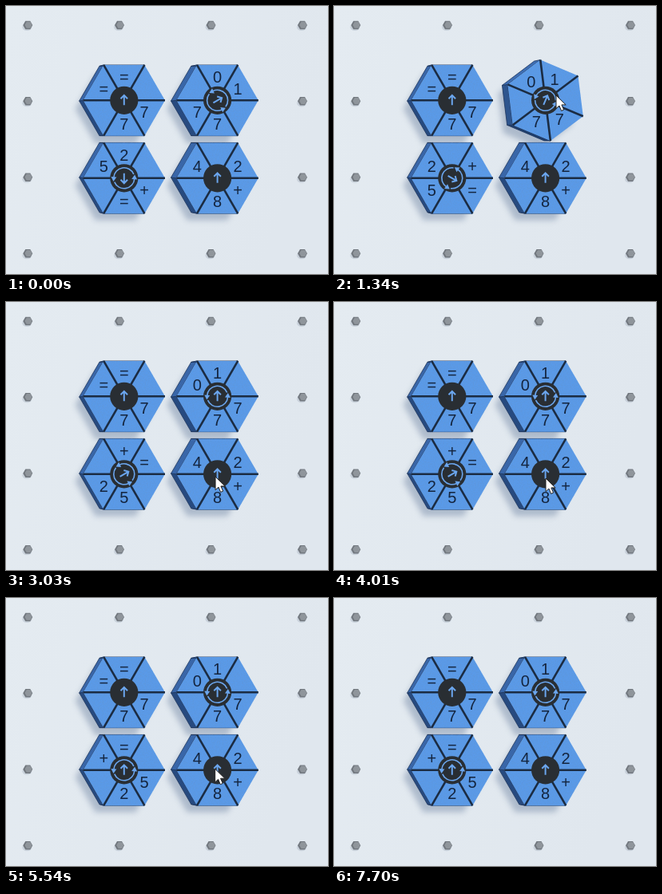
An HTML page that plays this animation: 403 by 336 pixels, repeating every 7770 ms.

```html
<!DOCTYPE html>
<html lang="en">
<head>
<meta charset="utf-8">
<title>Hex tiles</title>
<style>
  html, body { margin: 0; width: 100%; height: 100%; overflow: hidden; background: #e1e8ef; }
  svg { display: block; width: 100vw; height: 100vh; }
  text { font: 20px "Liberation Sans", Arial, sans-serif; fill: #14253f; text-anchor: middle; }
</style>
</head>
<body>
<svg id="stage" viewBox="0 0 403 336">
  <defs>
    <linearGradient id="bg" x1="0" x2="1" y1="0" y2="0.3">
      <stop offset="0" stop-color="#e4ebf1"/>
      <stop offset="1" stop-color="#e0e7ee"/>
    </linearGradient>
    <filter id="blur" x="-30%" y="-30%" width="160%" height="160%">
      <feGaussianBlur stdDeviation="3.5"/>
    </filter>
    <filter id="grain" x="0" y="0" width="100%" height="100%">
      <feTurbulence type="fractalNoise" baseFrequency="0.7" numOctaves="2" seed="4"/>
      <feColorMatrix values="0 0 0 0 0.12  0 0 0 0 0.3  0 0 0 0 0.62  1.2 0 0 0 -0.48"/>
      <feComposite in2="SourceGraphic" operator="in" result="n"/>
      <feMerge><feMergeNode in="SourceGraphic"/><feMergeNode in="n"/></feMerge>
    </filter>
  </defs>
  <rect width="403" height="336" fill="url(#bg)"/>
  <g id="pegs"></g>
  <g id="shadows" filter="url(#blur)" fill="#8a9bb4" opacity="0.6"></g>
  <g id="tiles"></g>
  <circle id="press" r="12" fill="#c8142e" opacity="0.75"/>
  <path id="cursor" d="M0 0V16.6L3.9 13 6.6 19.4 9.6 18.1 6.9 11.9H12.2Z"
        fill="#fff" stroke="#222" stroke-width="1" stroke-linejoin="round"/>
</svg>
<script>
const LOOP = 7770, TURN = 450, PRESS = 150;
const FACE_R = 51.2, BASE_R = 50.3, LABEL_R = 29.3;
const $ = id => document.getElementById(id);

function add(parent, tag, attrs = {}, text) {
  const node = document.createElementNS('http://www.w3.org/2000/svg', tag);
  set(node, attrs);
  if (text) node.textContent = text;
  parent.appendChild(node);
  return node;
}
function set(node, attrs) {
  for (const key in attrs) node.setAttribute(key, attrs[key]);
}

const rad = deg => deg * Math.PI / 180;
const polar = (x, y, r, deg) => [x + r * Math.cos(rad(deg)), y + r * Math.sin(rad(deg))];
const hex = (x, y, r, turn = 0) => [0, 1, 2, 3, 4, 5].map(i => polar(x, y, r, turn + 60 * i));
const points = list => list.map(p => p.map(v => v.toFixed(2)).join()).join(' ');
const mix = (a, b, k) => `rgb(${a.map((v, i) => Math.round(v + (b[i] - v) * k))})`;

// Labels run clockwise from the top sector, as seen with the arrow pointing up.
const tiles = [
  { x: 147.8, y: 118.3, bx: 142, by: 119, labels: ['=', '', '7', '7', '', '='], start: 0, clicks: [] },
  { x: 264.6, y: 118.3, bx: 256.8, by: 119, labels: ['1', '', '7', '7', '', '0'], start: 60, clicks: [1169] },
  { x: 147.8, y: 215.8, bx: 142, by: 215, labels: ['=', '', '5', '2', '', '+'], start: 180, clicks: [530, 1812, 4932] },
  { x: 264.6, y: 215.8, bx: 256.8, by: 215, labels: ['', '2', '+', '8', '', '4'], start: 0, clicks: [] }
];
const presses = tiles.flatMap(t => t.clicks);

// Pointer stops: time, x, y
const stops = [
  [0, 168, 340], [70, 167, 302], [470, 161, 224], [570, 161, 224],
  [990, 277, 112], [1340, 278, 112], [1700, 161, 222], [2120, 161, 221],
  [2350, 161, 221], [2950, 262, 219], [4010, 265, 221], [4250, 265, 221],
  [4800, 161, 224], [5050, 161, 224], [5600, 265, 214], [6250, 255, 203],
  [6950, 252, 345], [LOOP, 252, 345]
];

function buildPegs() {
  for (const y of [24, 119.3, 214.8, 310.3])
    for (const x of [27.3, 142, 256.5, 371]) {
      add($('pegs'), 'ellipse', { cx: x - 1, cy: y + 2.5, rx: 6, ry: 4.5, fill: '#b9c3cf', opacity: 0.6 });
      add($('pegs'), 'polygon', { points: points(hex(x, y, 6)), fill: '#71777e' });
      add($('pegs'), 'polygon', { points: points(hex(x + 0.8, y - 0.3, 4.6)), fill: '#8f959b' });
    }
}

function buildTile(t) {
  t.shadow = add($('shadows'), 'polygon');
  const g = add($('tiles'), 'g');
  t.sides = hex(0, 0, 1).map(() => add(g, 'polygon', { stroke: '#1d355c', 'stroke-width': 0.8, 'stroke-linejoin': 'round' }));
  t.face = add(g, 'polygon', { fill: '#5a9ae8', filter: 'url(#grain)' });
  t.lines = add(g, 'path', { stroke: '#1b2c43', 'stroke-width': 2.6 });
  t.texts = t.labels.map(s => add(g, 'text', {}, s));
  add(g, 'circle', { cx: t.x, cy: t.y, r: 17.6, fill: '#292e33' });
  t.icon = add(g, 'g', { fill: 'none', stroke: '#6ba6ee', 'stroke-width': 2 });
  add(t.icon, 'path', { d: 'M0 6V-6M-4.3 -2L0 -6.4L4.3 -2' });
  if (t.clicks.length)
    for (const turn of [0, 180]) {
      const half = add(t.icon, 'g', { transform: `rotate(${turn})` });
      const a = polar(0, 0, 13, 158), b = polar(0, 0, 13, 4);
      add(half, 'path', { d: `M${a}A13 13 0 0 0 ${b}`, 'stroke-width': 1.6 });
      add(half, 'path', { d: 'M9.4 1.2L13.3 -4.2L16.3 1.8Z', fill: '#6ba6ee', stroke: 'none' });
    }
}

function drawTile(t, turn) {
  const top = hex(t.x, t.y, FACE_R, turn), base = hex(t.bx, t.by, BASE_R, turn);
  set(t.shadow, { points: points(base), transform: 'translate(-5 10)' });
  t.sides.forEach((side, i) => {
    const j = (i + 1) % 6, n = rad(turn + 60 * i + 30);
    const light = (1 + Math.sin(n)) / 2;
    set(side, {
      points: points([top[i], top[j], base[j], base[i]]),
      fill: mix([66, 116, 188], [30, 60, 106], light),
      visibility: Math.cos(n) < 0.2 ? 'visible' : 'hidden'
    });
  });
  set(t.face, { points: points(top) });
  set(t.lines, { d: [0, 1, 2].map(i => `M${top[i]}L${top[i + 3]}`).join('') });
  t.texts.forEach((label, i) => {
    const [x, y] = polar(t.x, t.y, LABEL_R, turn + 60 * i - 90);
    set(label, { x, y: y + 7.2 });
  });
  set(t.icon, { transform: `translate(${t.x} ${t.y}) rotate(${turn})` });
}

const clamp = v => Math.max(0, Math.min(1, v));
const easeOut = p => 1 - (1 - p) ** 2;
const smooth = p => p * p * (3 - 2 * p);

function pointerAt(time) {
  const i = stops.findIndex(s => s[0] > time);
  const [t0, x0, y0] = stops[i - 1], [t1, x1, y1] = stops[i];
  const k = smooth((time - t0) / (t1 - t0));
  return [x0 + (x1 - x0) * k, y0 + (y1 - y0) * k];
}

function render(time) {
  for (const t of tiles) {
    const turned = t.clicks.reduce((sum, c) => sum + easeOut(clamp((time - c) / TURN)), 0);
    drawTile(t, t.start - 60 * turned);
  }
  const [x, y] = pointerAt(time);
  const pressed = presses.some(c => time >= c && time < c + PRESS);
  set($('cursor'), { transform: `translate(${x} ${y})` });
  set($('press'), { cx: x, cy: y + 0.5, visibility: pressed ? 'visible' : 'hidden' });
}

buildPegs();
tiles.forEach(buildTile);
const begin = performance.now();
function tick() {
  render((performance.now() - begin) % LOOP);
  requestAnimationFrame(tick);
}
tick();
</script>
</body>
</html>
```
